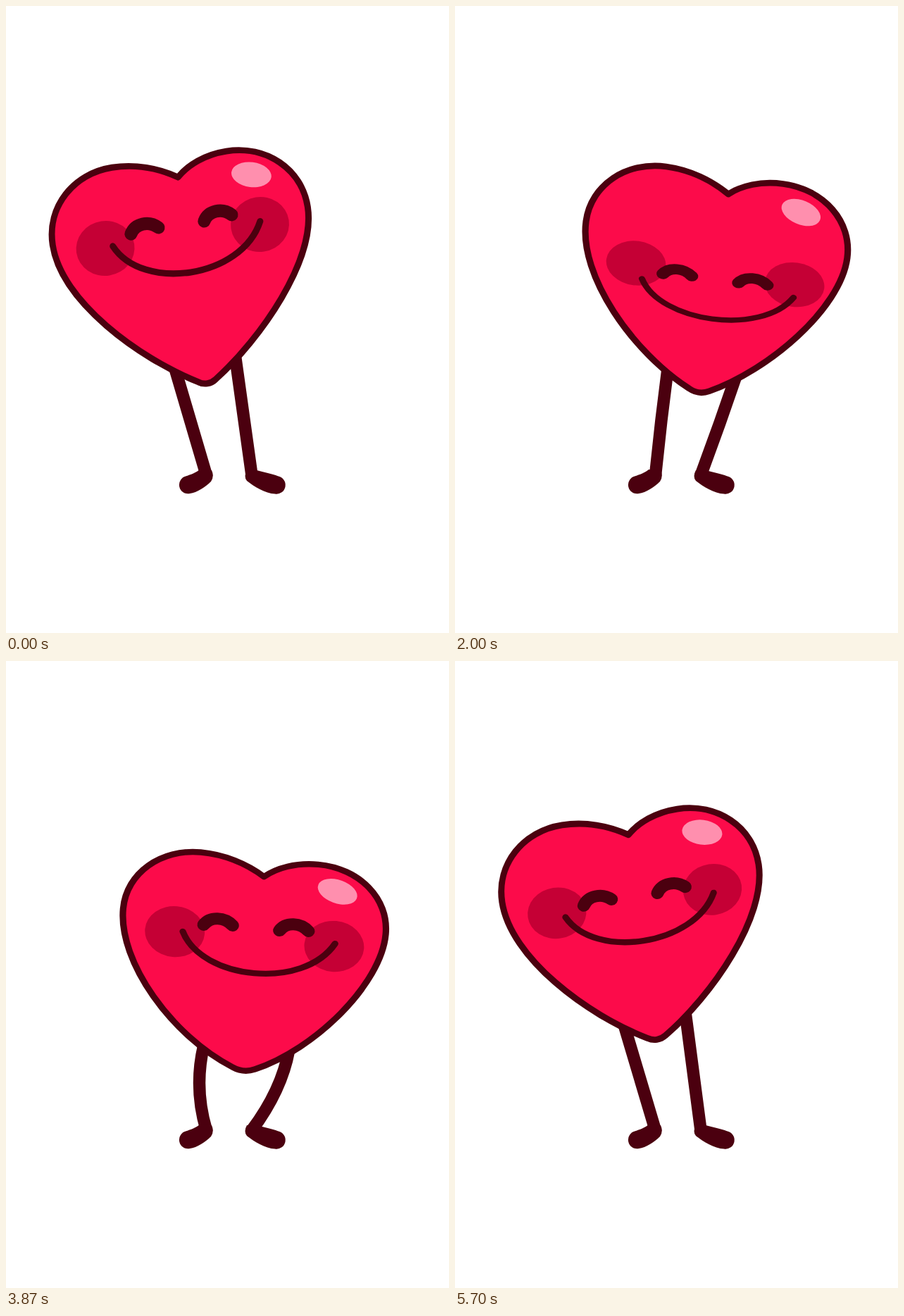
An HTML page that plays this animation: 629x890 px, repeating every 5730 ms.

```html
<!DOCTYPE html>
<html lang="en">
<head>
<meta charset="utf-8">
<title>Dancing heart</title>
<style>
  html, body { margin: 0; width: 100%; height: 100%; overflow: hidden; background: #fff; }
  svg { display: block; width: 100vw; height: 100vh; }
  .line { fill: none; stroke: #4b000f; stroke-linecap: round; stroke-linejoin: round; }
</style>
</head>
<body>
<svg viewBox="0 0 629 890">
  <g fill="#4b000f">
    <path id="legLeft" class="line" stroke-width="17.5"/>
    <path id="legRight" class="line" stroke-width="17.5"/>
    <path d="M275 658C269 663 262 665 256 667.3A12.5 12.5 0 0 0 261 692C271 691 284 682 291 675Q296 668 292 659Z"/>
    <path d="M356 659C366 662 378 664 386 667.3A12.5 12.5 0 0 1 382 692.5C368 692 352 682 342 674Q337 668 342 659Z"/>
  </g>
  <!-- Body coordinates have their origin at the tip of the heart. -->
  <g id="body">
    <path id="heart" fill="#fc0b4a" stroke="#4b000f" stroke-width="9" stroke-linejoin="round"/>
    <ellipse cx="107" cy="-283.7" rx="28.5" ry="17.7" fill="#ff8fae" transform="rotate(16 107 -283.7)"/>
    <g id="cheeks" fill="#c50035">
      <ellipse cx="-113" rx="41.5" ry="38.5"/>
      <ellipse cx="109" rx="41.5" ry="38.5"/>
    </g>
    <g id="features" class="line">
      <path stroke-width="9" d="M-102 3C-70 73 72 75 110 0"/>
      <path stroke-width="18" d="M-74-10C-66-24-46-25-34-13"/>
      <path stroke-width="18" d="M31.5-12C39.5-26 59.5-27 71.5-15"/>
    </g>
  </g>
</svg>
<script>
const LOOP = 5730;
const SWAY = 1.44;
const BOB = SWAY / 2;
const TAU = 2 * Math.PI;
const el = id => document.getElementById(id);
const start = performance.now();

// Side-to-side swing: 1 at far left, -1 at far right, resting a little at both ends.
function swing(t) {
  const a = TAU * t / SWAY;
  return (Math.cos(a) - 0.075 * Math.cos(3 * a)) / 0.925;
}

// Dip of the bounce: 0 at the top, 1 at the bottom, with a long hang at the top.
function dip(t) {
  const a = TAU * t / BOB;
  return (1 - Math.cos(a)) / 2 - 0.205 * Math.sin(a) ** 2;
}

// 25 poses per second, shown on a 30 Hz clock.
function poseTime(ms) {
  const tick = Math.floor((ms + 4) * 0.03);
  return Math.floor(tick * 25 / 30 + 1e-6) / 25;
}

// The lower sides fill out and the tip gets blunter as the heart is squashed.
function heartPath(squash) {
  const tip = 12 + 7 * squash;
  const bendX = 88 + 24 * squash;
  const bendY = -51 + 18 * squash;
  return `M3.5-296C-22-313-54-324-87-324C-142-324-187-283-187-228
    C-187-147 ${-bendX - 3} ${bendY} ${-tip} -4C-5 1 5 1 ${tip} -4
    C${bendX - 4} ${bendY} 179-150 179-226C179-281 134-322 77-322C46-322 20-311 3.5-296Z`;
}

function draw(ms) {
  const t = poseTime(ms % LOOP);
  const lean = swing(t + 0.005);
  const drop = dip(t + 0.01);
  const squash = dip(t - 0.02);
  const x = 318 - 32 * lean;
  const y = 536 + 70.5 * drop;
  const angle = -8.8 * lean;
  const sx = 1 + 0.06 * dip(t - 0.04);
  const sy = 1 - 0.13 * squash;
  el('body').setAttribute('transform',
    `translate(${x} ${y}) rotate(${angle}) scale(${sx} ${sy})`);
  el('heart').setAttribute('d', heartPath(squash));

  const faceX = 6 * dip(t - 0.08) - 1;
  const faceScale = 1.03 - 0.24 * dip(t - 0.11);
  const place = (id, faceY) => el(id).setAttribute('transform',
    `translate(${faceX} ${faceY}) scale(1 ${faceScale})`);
  place('cheeks', -214 + 62.5 * dip(t - 0.08));
  place('features', -221 + 95 * dip(t - 0.093));

  const cos = Math.cos(angle * Math.PI / 180);
  const sin = Math.sin(angle * Math.PI / 180);
  function leg(id, side, hipX, hipY, ankleX) {
    const u = hipX * sx, v = hipY * sy, ankleY = 666;
    const hx = x + u * cos - v * sin + side * 24 * drop;
    const hy = y + u * sin + v * cos;
    const bendX = (hx + ankleX) / 2 + side * 38 * drop * drop;
    el(id).setAttribute('d',
      `M${hx} ${hy}Q${bendX} ${(hy + ankleY) / 2} ${ankleX} ${ankleY}`);
  }
  leg('legLeft', -1, -43, -34, 284.5);
  leg('legRight', 1, 45, -36, 349);
}

function frame() {
  draw(performance.now() - start);
  requestAnimationFrame(frame);
}
frame();
</script>
</body>
</html>
```
